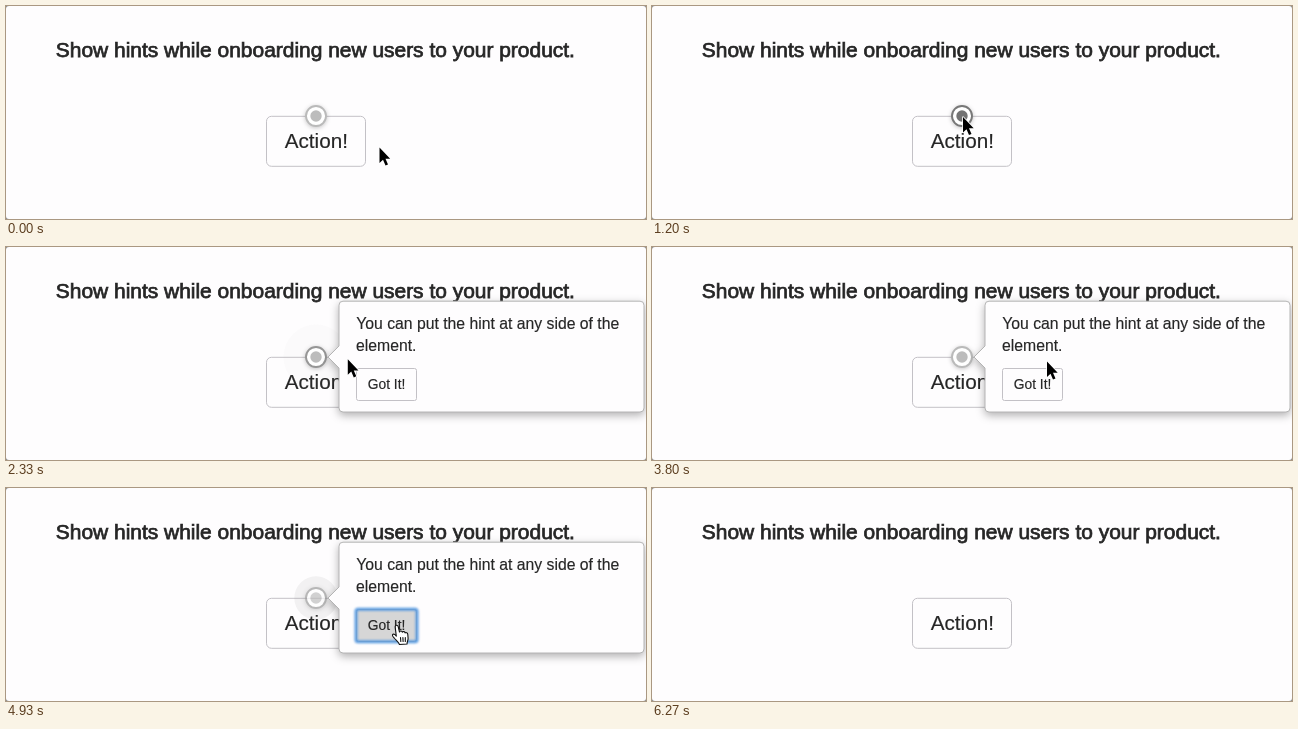
Animation of 640 by 213 pixels, one loop 6.39 s. Source, as an HTML page:

```html
<!DOCTYPE html>
<html lang="en">
<head>
<meta charset="utf-8">
<title>Onboarding hint</title>
<style>
  html, body { margin: 0; width: 100%; height: 100%; overflow: hidden; background: #8b8b8b; }
  svg { display: block; width: 100vw; height: 100vh; }
  text { font-family: "Liberation Sans", Arial, sans-serif; fill: #262626; stroke: #262626; stroke-width: .15; }
  .title { font-size: 20.95px; stroke-width: .75; }
  .body { font-size: 15.75px; }
  #rim { filter: drop-shadow(0 1px 2px rgba(0, 0, 0, .22)); }
  #bubble { filter: drop-shadow(0 3px 4px rgba(0, 0, 0, .3)); }
  #glow { filter: blur(.8px); }
</style>
</head>
<body>
<svg viewBox="0 0 640 213">
  <rect width="640" height="213" rx="3" fill="#fefdfe"/>
  <text class="title" x="49.8" y="51">Show hints while onboarding new users to your product.</text>

  <rect id="action" x="260.5" y="110.3" width="99" height="50" rx="5"/>
  <text x="278.7" y="142" font-size="20.7">Action!</text>

  <g id="hint" transform="translate(310 110)">
    <circle id="pulse" fill="#929292"/>
    <circle id="rim" r="10" fill="#fff" stroke-width="1.9"/>
    <circle id="dot" r="5.7"/>
  </g>

  <g id="popup">
    <path id="bubble" fill="#fefdfe" stroke="#b4b4b4"
      d="M337 54.2H634a4 4 0 0 1 4 4V161a4 4 0 0 1-4 4H337a4 4 0 0 1-4-4V121L322 110L333 99V58.2a4 4 0 0 1 4-4Z"/>
    <text class="body" x="350.2" y="82">You can put the hint at any side of the</text>
    <text class="body" x="350" y="104">element.</text>
    <rect id="confirm" x="350.5" y="121.5" width="60" height="32" rx="2"/>
    <rect id="glow" x="350" y="121.2" width="61" height="32.6" rx="2" fill="none" stroke="#5a9be0" stroke-width="3"/>
    <text x="361.8" y="142" font-size="13.8">Got It!</text>
  </g>

  <g id="cursor" stroke-linejoin="round" stroke-linecap="round">
    <path id="arrow" fill="#000" stroke="#fff" stroke-width="1.6" paint-order="stroke"
      d="M.5 .5V16L4 12.7L6.5 18.6L9 17.5L6.5 11.8H11.2Z"/>
    <g id="hand" stroke="#111" stroke-width="1.1">
      <path fill="#fff" d="M-1.3 1.6C-1.6-.6 1.2-.8 1.7 1.2L3 6.5C3.4 5 5.6 5.2 5.8 6.8C6.4 5.6 8.4 5.9 8.6 7.5C9.4 6.6 11.2 7.2 11.3 9L11.6 13C11.6 15 10.6 16 10.5 18.5L3 19C2.5 17 0 15-1.8 13C-3 11.6-4.6 10.6-4 9.2C-3.2 8-1.6 9-.2 10.6Z"/>
      <path fill="none" d="M4 12l.3 4M6.4 12l.2 4M8.8 12v4"/>
    </g>
  </g>
</svg>
<script>
const LOOP = 6390, PULSE = 3000, PULSE_OFFSET = 430;
const $ = id => document.getElementById(id);
const clamp = v => Math.max(0, Math.min(1, v));
const ramp = (t, from, to) => clamp((t - from) / (to - from));
const smooth = p => p * p * (3 - 2 * p);
const mix = (a, b, p) => a + (b - a) * p;
const gray = v => `rgb(${v},${v},${v})`;
const set = (id, attrs) => {
  for (const name in attrs) $(id).setAttribute(name, attrs[name]);
};
const show = (id, on) => set(id, { visibility: on ? "visible" : "hidden" });

// Pointer moves: start, end, x, y of the destination
const moves = [
  [130, 660, 320.5, 117.5],
  [770, 930, 310.5, 110.5],
  [2085, 2685, 394.5, 114],
  [3800, 4400, 390.5, 137.5],
  [5770, 6270, 345, 216]
];
function pointerAt(t) {
  let x = 373, y = 141;
  for (const [from, to, toX, toY] of moves) {
    const p = smooth(ramp(t, from, to));
    x = mix(x, toX, p);
    y = mix(y, toY, p);
  }
  return [x, y];
}

// Pulse stages: phase, scale, opacity
const stages = [[0, 0, 0], [.25, 0, .1], [.5, .1, .3], [.75, .5, .5], [1, 1, 0]];
function pulseAt(phase) {
  const i = Math.min(3, Math.floor(phase * 4));
  const p = 1 - (1 - (phase * 4 - i)) ** 1.7;
  const [, s0, o0] = stages[i], [, s1, o1] = stages[i + 1];
  return { r: 35 * mix(s0, s1, p), opacity: .45 * mix(o0, o1, p) };
}

function render(t) {
  const [x, y] = pointerAt(t);
  const phase = (t + PULSE_OFFSET) % PULSE / PULSE;
  const overAction = t < 870 && x < 360;
  const overConfirm = t > 3800 && t < 5150 && y > 121;
  const pressed = t >= 4790;
  const hintHover = ramp(t, 850, 960) * (1 - ramp(t, 2130, 2270));

  set("action", { fill: overAction ? "#e5e5e5" : "#fefdfe", stroke: overAction ? "#aaa" : "#c3c1c6" });

  set("pulse", pulseAt(phase));
  const rim = mix(186, 150, ramp(phase, .5, .75));
  set("rim", { stroke: gray(Math.round(mix(rim, 120, hintHover))) });
  set("dot", { fill: gray(Math.round(mix(188, 115, hintHover))) });
  set("hint", { opacity: 1 - ramp(t, 4840, 5120) });

  set("popup", { opacity: ramp(t, 1420, 1605) * (1 - ramp(t, 4960, 5180)) });
  set("confirm", {
    fill: overConfirm ? (pressed ? "#d6d6d6" : "#e5e5e5") : "#fefdfe",
    stroke: overConfirm ? "#aaa" : "#c3c1c6"
  });
  set("glow", { display: pressed ? "inline" : "none" });

  const pointing = overAction || overConfirm;
  show("hand", pointing);
  show("arrow", !pointing);
  set("cursor", { transform: `translate(${x} ${y})` });
}

const start = performance.now();
function tick() {
  render((performance.now() - start) % LOOP);
  requestAnimationFrame(tick);
}
tick();
</script>
</body>
</html>
```
